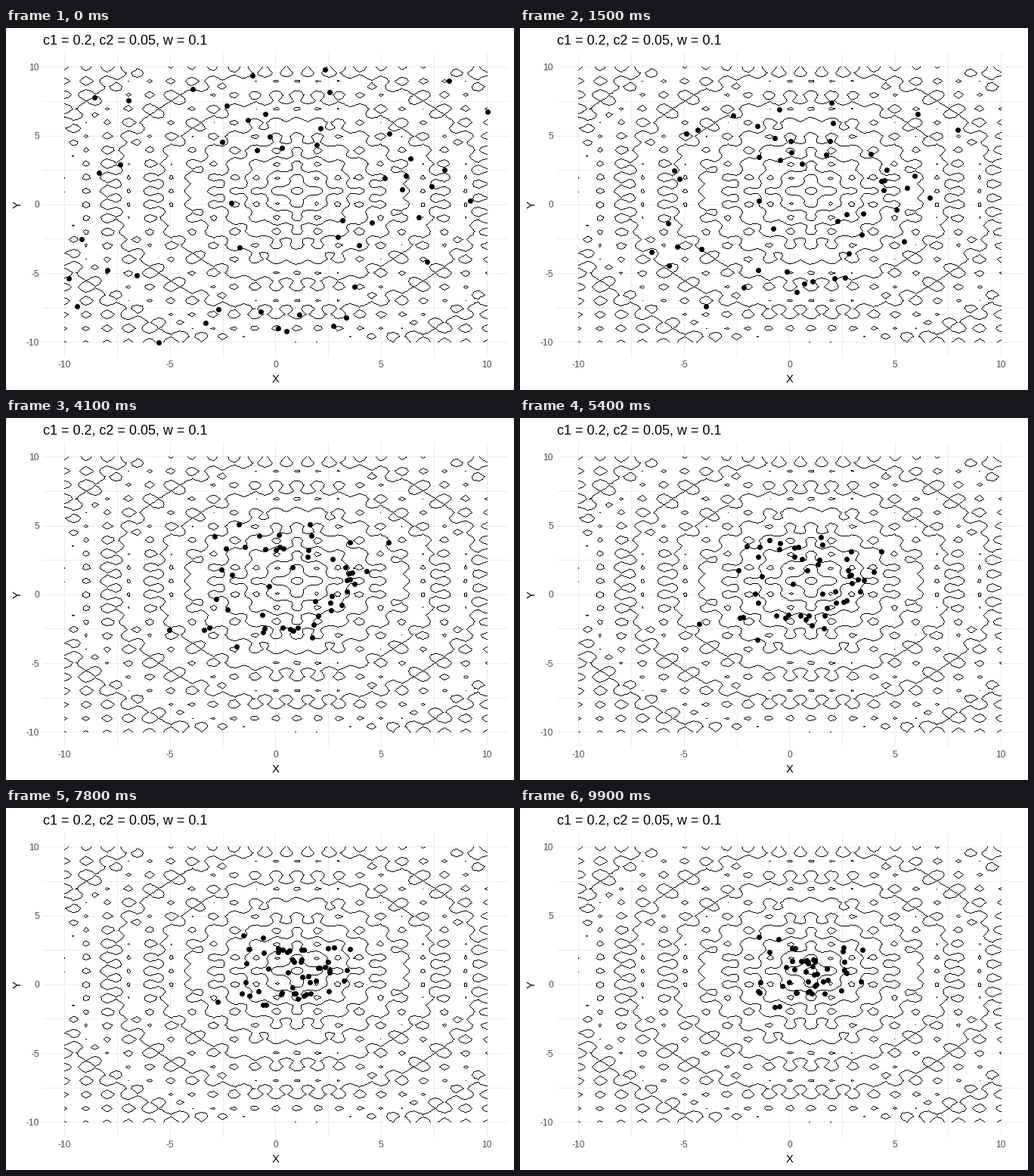
A matplotlib script for the animation above (10 s loop, 672 px wide and 480 px high).

```python
import numpy as np
import matplotlib.pyplot as plt
from matplotlib.animation import FuncAnimation

W, H = 672, 480
FRAMES, STEP = 100, 100
C1, C2, INERTIA = 0.2, 0.05, 0.1
plt.rcParams["font.family"] = "Liberation Sans"


def px(x):
    return 356.5 + 27.95 * x


def py(y):
    return 233.8 - 18.25 * y


def pixel(v):
    return np.rint(v).astype(int)


def ackley(x, y):
    bowl = -20 * np.exp(-0.2 * np.sqrt(0.5 * ((x - 1) ** 2 + (y - 1) ** 2)))
    ripple = -np.exp(0.5 * (np.cos(2 * np.pi * x) + np.cos(2 * np.pi * y)))
    return bowl + ripple + np.e + 20


axis = np.linspace(-10, 10, 100)

# Opening pose: each particle starts on a node of the search axis
start_x = [7, 15, 30, 44, 61, 62, 90, 99, 38, 43, 47, 48, 45, 51, 37, 59, 60,
           76, 81, 80, 75, 79, 86, 89, 95, 83, 72, 65, 64, 69, 85, 68, 66, 63,
           55, 52, 50, 46, 36, 33, 22, 41, 39, 13, 8, 4, 1, 10, 17, 3]
start_y = [88, 87, 91, 96, 98, 90, 94, 83, 85, 80, 82, 74, 69, 70, 72, 71, 77,
           75, 66, 60, 59, 55, 56, 62, 51, 45, 43, 44, 38, 35, 29, 20, 9, 6,
           10, 4, 5, 11, 12, 7, 0, 34, 50, 64, 61, 37, 23, 26, 24, 13]


def fly():
    """Particle swarm: one step per frame, pulled to own best and optimum."""
    rng = np.random.default_rng(1)
    pos = np.column_stack([axis[start_x], axis[start_y]])
    best, vel, goal = pos.copy(), np.zeros_like(pos), np.ones(2)
    path = [pos]
    for _ in range(FRAMES - 1):
        r1, r2 = rng.random((2, len(pos), 1))
        vel = INERTIA * vel + C1 * r1 * (best - pos) + C2 * r2 * (goal - pos)
        pos = pos + vel
        better = ackley(*pos.T) < ackley(*best.T)
        best[better] = pos[better]
        path.append(pos)
    return path


def draw_line(canvas, a, b):
    """Hard one-pixel line between two pixel positions."""
    n = np.abs(b - a).max() + 1
    cols, rows = pixel(np.linspace(a, b, n)).T
    canvas[rows, cols] = 0


fig = plt.figure(figsize=(W / 72, H / 72), dpi=72, facecolor="white")
ax = fig.add_axes([0, 0, 1, 1])

# Panel grid
canvas = np.full((H, W, 3), 255, np.uint8)
left, right, top, bottom = pixel(np.array([px(-11), px(11), py(11), py(-11)]))
for v in np.arange(-10, 10.1, 2.5):
    canvas[top:bottom + 1, pixel(px(v))] = 235
    canvas[pixel(py(v)), left:right + 1] = 235

# Contours of the objective, without antialiasing
gx, gy = np.meshgrid(axis, axis)
contours = ax.contour(px(gx), py(gy), ackley(gx, gy),
                      levels=np.arange(2, 20, 2))
for level in contours.get_paths():
    for line in level.to_polygons(closed_only=False):
        points = pixel(line)
        for a, b in zip(points, points[1:]):
            draw_line(canvas, a, b)
contours.remove()

ax.imshow(canvas, interpolation="nearest", aspect="auto", zorder=0)
ax.set_xlim(-0.5, W - 0.5)
ax.set_ylim(H - 0.5, -0.5)
ax.axis("off")

# Labels
tick = dict(size=12, color="#4D4D4D", va="center")
for v in range(-10, 11, 5):
    ax.text(px(v) - 0.5, 446.5, str(v), ha="center", **tick)
    ax.text(43.5, py(v) + 1.2, str(v), ha="right", **tick)
name = dict(size=14.7, ha="center", va="center")
ax.text(356, 465, "X", **name)
ax.text(14.7, 233.5, "Y", rotation=90, **name)
ax.text(48.5, 21.3, "c1 = 0.2, c2 = 0.05, w = 0.1", size=18, va="baseline")

dots, = ax.plot([], [], "o", color="black", ms=7, mew=0,
                antialiased=False, zorder=3)
path = fly()


def update(i):
    x, y = path[i].T
    dots.set_data(px(x), py(y))
    return dots,


anim = FuncAnimation(fig, update, frames=FRAMES, interval=STEP,
                     repeat=True, repeat_delay=0)
plt.show()
```
